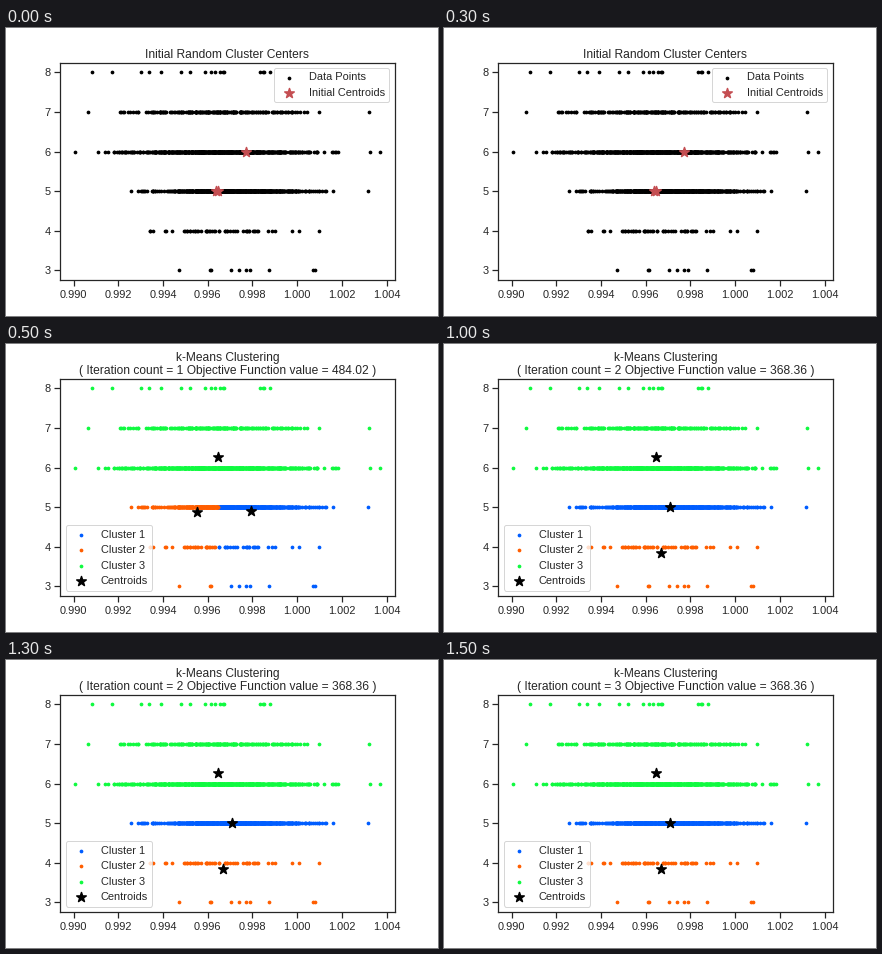
Animation of 432x288 px, one loop 2000 ms. Source, as a matplotlib script:

```python
import matplotlib.pyplot as plt
import numpy as np
from matplotlib.animation import FuncAnimation

INK = "0.15"
BLUE, ORANGE, GREEN, RED = "#005dff", "#ff5e00", "#10fa40", "#c44e52"

plt.rcParams.update({
    "font.family": "Liberation Sans",
    "text.color": INK,
    "axes.edgecolor": INK,
    "axes.linewidth": 1.25,
    "axes.titlesize": 12,
    "legend.fontsize": 11,
})
for side in ("xtick", "ytick"):
    plt.rcParams.update({
        f"{side}.color": INK,
        f"{side}.labelsize": 11,
        f"{side}.major.size": 6,
        f"{side}.major.width": 1.25,
    })

# Row: count, mean, spread, low, high, in units of 0.0001 above 0.99
ROWS = {
    3: (10, 74, 20, 47.2, 107.8),
    4: (53, 65, 16, 34, 109.8),
    5: (681, 71, 16, 25.6, 131.5),
    6: (638, 66, 20, 0.7, 136.9),
    7: (199, 61, 21, 6.4, 132.3),
    8: (18, 52, 23, 8.4, 88),
}
SPLIT = 64.6
START = [(63.6, 5), (64.4, 5), (77, 6)]
FIRST = [(79.4, 4.89), (55.3, 4.87), (64.5, 6.26)]
FINAL = [(70.8, 5), (66.9, 3.83), (64.5, 6.26)]
OBJECTIVE = [484.02, 368.36, 368.36]


def make_points():
    rng = np.random.default_rng(4)
    xs, ys = [], []
    for row, (count, mean, spread, low, high) in ROWS.items():
        cloud = np.round(rng.normal(mean, spread, count), 1)
        cloud = cloud[(cloud > low) & (cloud < high)]
        xs += [low, *cloud, high]
        ys += [row] * (len(cloud) + 2)
    return np.array(xs), np.array(ys)


X, Y = make_points()


def density(units):
    return 0.99 + np.asarray(units) * 1e-4


def dots(mask, color, label):
    ax.scatter(density(X[mask]), Y[mask], s=20, marker=".", color=color,
               linewidth=1.5, label=label)


def stars(centers, color, label):
    cx, cy = np.transpose(centers)
    ax.scatter(density(cx), cy, s=100, marker="*", color=color,
               linewidth=1.5, label=label)


def clusters(step):
    if step == 1:
        low = Y <= 5
        return low & (X >= SPLIT), low & (X < SPLIT), Y >= 6
    return Y == 5, Y <= 4, Y >= 6


def update(step):
    ax.clear()
    if step == 0:
        dots(Y > 0, "black", "Data Points")
        stars(START, RED, "Initial Centroids")
        title = "Initial Random Cluster Centers"
    else:
        colors = (BLUE, ORANGE, GREEN)
        for i, (mask, color) in enumerate(zip(clusters(step), colors), 1):
            dots(mask, color, f"Cluster {i}")
        stars(FIRST if step == 1 else FINAL, "black", "Centroids")
        title = (f"k-Means Clustering\n( Iteration count = {step} "
                 f"Objective Function value = {OBJECTIVE[step - 1]} )")
    ax.set_title(title, pad=5, linespacing=1.07)
    ticks = 0.99 + 0.002 * np.arange(8)
    ax.set_xticks(ticks, [f"{t:.3f}" for t in ticks])
    ax.set_yticks(range(3, 9))
    ax.legend(loc="lower left" if step else "upper right")
    return []


fig = plt.figure(figsize=(6, 4), dpi=72, facecolor="white")
ax = fig.add_axes([0.125, 0.125, 0.775, 0.755])
anim = FuncAnimation(fig, update, frames=4, interval=500, repeat=True,
                     repeat_delay=0, blit=False)
plt.show()
```
